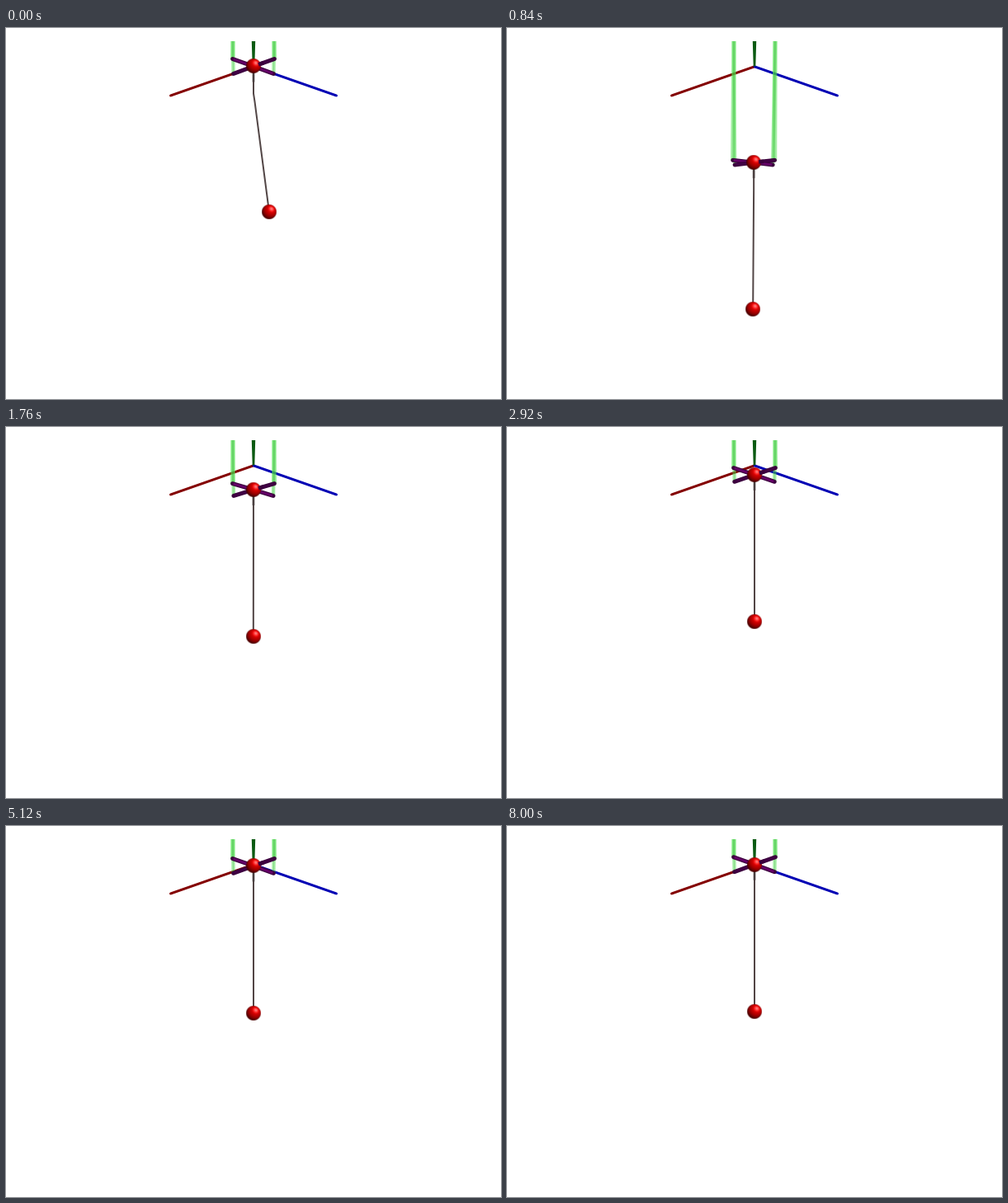
Write a matplotlib script that moves like this. It is 600 by 450 pixels and loops after 8.04 s.

```python
import numpy as np
import matplotlib.pyplot as plt
from matplotlib.animation import FuncAnimation

W, H, DPI = 600, 450, 100
FRAMES, STEP = 201, 40
PX = 72 / DPI
CX, REST, ROPE, TOP, R = 300, 46.5, 178.4, 16, 8.9

fig = plt.figure(figsize=(W / DPI, H / DPI), dpi=DPI, facecolor="white")
ax = fig.add_axes([0, 0, 1, 1])
ax.axis("off")


def pulse(t, peak):
    """Quick rise to 1 at the peak time, then a soft decay."""
    u = t / peak
    return (u * np.exp(1 - u)) ** 2


def drop(t):
    """Fall on the elastic strings, rebound, then creep back up."""
    start = 1 - np.exp(-(t / .376) ** 2)
    bounce = np.cos(np.pi / 2 * np.clip((t - .86) / .84, -1, 1)) ** 2
    return start * (124 * np.exp(-.815 * t) + 55 * bounce)


def sway(t):
    return -1.8 * pulse(t, .4)


def swing(t):
    return 19 * np.exp(-(t / .2) ** 2) - 2.7 * pulse(t, .48)


def line(color, width, z, cap="butt", **kw):
    return ax.plot([], [], color=color, lw=width * PX, zorder=z,
                   solid_capstyle=cap, snap=False, **kw)[0]


def sphere(n=90):
    v = np.linspace(-1, 1, n)
    x, y = np.meshgrid(v, v)
    r2 = x * x + y * y
    z = np.sqrt(np.clip(1 - r2, 0, 1))
    light = np.array([.33, -.42, .85])
    light /= np.linalg.norm(light)
    lam = np.clip(x * light[0] + y * light[1] + z * light[2], 0, 1)
    spec = .5 * lam ** 22
    img = np.zeros((n, n, 4))
    img[..., 0] = np.clip(.3 + .6 * lam + spec, 0, 1)
    img[..., 1] = img[..., 2] = spec
    img[..., 3] = np.clip((1 - np.sqrt(r2)) * n / 12 + .5, 0, 1)
    return img


BALL = sphere()


def ball(z):
    return ax.imshow(BALL, zorder=z, interpolation="bilinear", aspect="auto")


def place(im, x, y):
    im.set_extent((x - R, x + R, y + R, y - R))


# fixed axes
for side, color in ((-1, "#840000"), (1, "#0000b4")):
    line(color, 3, 1, "round").set_data([CX, CX + side * 100.5], [46.8, 82])
ax.fill([297.8, 302.2, 301.3, 298.7], [TOP, TOP, 46.5, 46.5],
        color="#0b5a12", lw=0, zorder=2, snap=False)

# strings and arms: (side, front)
corners = [(s, f) for f in (0, 1) for s in (-1, 1)]
strings = [(line("#4fe04f", 5.4 - f, 3, alpha=.5),
            line("#208a20", 1, 3.1, alpha=.22)) for s, f in corners]
arms = []
for s, f in corners:
    lit = (s < 0) != bool(f)
    arms.append((line("#3a003c", 5, 4 + f, "round"),
                 line("#660069" if lit else "#420046", 2.6, 4.1 + f)))
lip = line("#3a003c", 4.6, 7)
rope = line("#524646", 2, 3.5)
collar = line("#4a4040", 2.6, 3.6)
upper, lower = ball(6), ball(6)

ax.set_xlim(0, W)
ax.set_ylim(H, 0)


def draw(i):
    t = i * STEP / 1000
    d = drop(t)
    x, y = CX + sway(t), REST + d
    lx = CX + swing(t)
    ly = y + np.sqrt(ROPE ** 2 - (1.2 * (lx - x)) ** 2)
    dy = 9 - .053 * d

    for (s, f), (band, core), (edge, mid) in zip(corners, strings, arms):
        ex = x + s * (24.4 - .012 * d if f else 25.4)
        ey = y + (dy if f else -dy)
        for ln in (band, core):
            ln.set_data([CX + s * 25, ex], [TOP, ey])
        edge.set_data([x, ex], [y, ey])
        mid.set_data([x, ex - s], [y, ey - .04 * (ey - y)])
    lip.set_data([x + 6, x + 12], [y - dy * 6 / 25.4, y - dy * 12 / 25.4])

    # rope hangs straight from the pivot, then bends to the weight
    bend = y + 39
    rope.set_data([x, x, x + .08 * (lx - x), lx], [y, bend - 6, bend + 4, ly])
    collar.set_data([x, x], [y, y + 19])
    place(upper, x, y)
    place(lower, lx, ly)
    return []


anim = FuncAnimation(fig, draw, frames=FRAMES, interval=STEP,
                     init_func=lambda: draw(0), repeat=True, repeat_delay=0)
plt.show()
```
